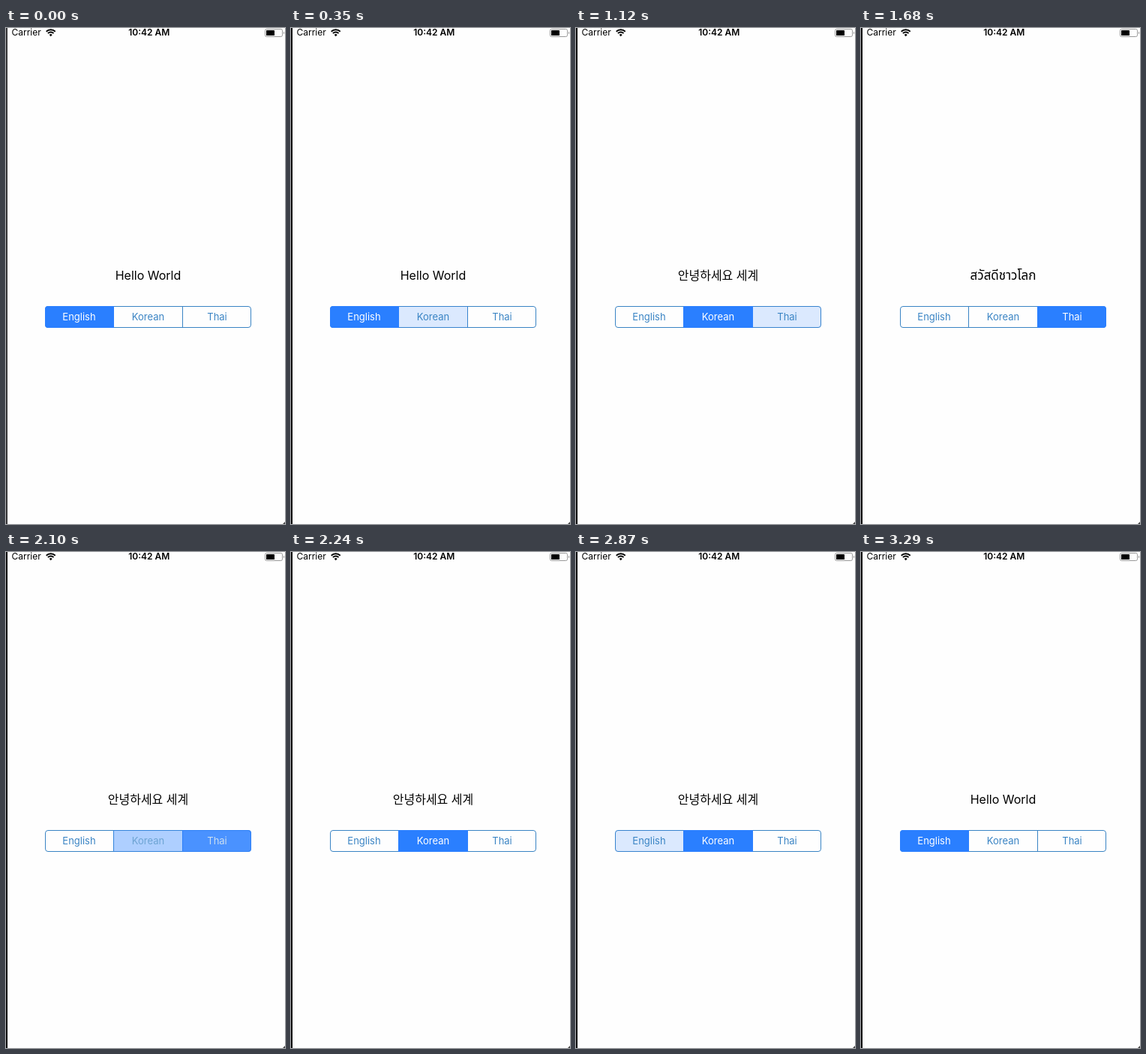
Write an HTML page that moves like this. It is 372 px wide and 660 px high and loops after 3.36 s.

```html
<!DOCTYPE html>
<html lang="en">
<head>
<meta charset="utf-8">
<title>Language switch</title>
<style>
html, body { margin: 0; height: 100%; overflow: hidden; background: #fefefe; }
svg { display: block; width: 372px; height: 660px; font-family: Inter, sans-serif; }
.status { font-size: 12px; }
.label { font-size: 13px; text-anchor: middle; }
#greeting { font-size: 16px; text-anchor: middle; }
#greeting:lang(ko) { font-family: "Noto Sans CJK KR", "Noto Sans CJK", sans-serif; }
#greeting:lang(th) { font-family: "Noto Sans Thai Looped", "Noto Sans Thai", "Noto Sans", sans-serif; font-size: 17px; }
</style>
</head>
<body>
<svg viewBox="0 0 372 660">
  <clipPath id="pill"><rect x="52" y="370" width="275" height="29" rx="4"/></clipPath>
  <rect id="edge" width="2" height="660"/>
  <path d="M372 657v3h-3z" fill="#444"/>

  <g class="status">
    <text x="7.5" y="10.4">Carrier</text>
    <text x="190.7" y="10.4" font-weight="600" text-anchor="middle">10:42 AM</text>
  </g>
  <g fill="none" stroke="#000" stroke-width="1.9">
    <path d="M53.7 4.7a8.6 8.6 0 0 1 12 0M55.9 7.1a5.4 5.4 0 0 1 7.6 0"/>
    <path d="M57.7 9a2.8 2.8 0 0 1 4 0l-2 2.2z" fill="#000" stroke="none"/>
  </g>
  <rect x="345.5" y="1.5" width="23" height="10" rx="2" fill="none" stroke="#999"/>
  <rect x="347" y="3" width="11" height="7" rx=".6"/>
  <path d="M370 4.5q2 2 0 4z" fill="#888"/>

  <text id="greeting" x="189.5" y="335"></text>
  <g fill="none" stroke="#3a84c4">
    <rect x="52.5" y="370.5" width="274" height="28" rx="3.5"/>
    <path d="M143.5 370v29M235.5 370v29"/>
  </g>
  <g id="fills" clip-path="url(#pill)" fill="#2a7fff"></g>
  <g id="labels" class="label"></g>
</svg>
<script>
const LOOP = 3360, STEP = 70, PRESSED = 0.16;
const languages = [
  { name: "English", lang: "en", hello: "Hello World", x: 52, width: 92 },
  { name: "Korean", lang: "ko", hello: "안녕하세요 세계", x: 143, width: 93 },
  { name: "Thai", lang: "th", hello: "สวัสดีชาวโลก", x: 235, width: 92 },
];
// Each tap: finger down, finger up, and the segments it moves between.
const taps = [
  { down: 280, up: 420, from: 0, to: 1 },
  { down: 1120, up: 1260, from: 1, to: 2 },
  { down: 1960, up: 2100, from: 2, to: 1 },
  { down: 2730, up: 2940, from: 1, to: 0 },
];

const find = id => document.getElementById(id);
const edge = find("edge"), greeting = find("greeting");

function add(parent, tag, attributes) {
  const node = document.createElementNS("http://www.w3.org/2000/svg", tag);
  for (const key in attributes) node.setAttribute(key, attributes[key]);
  return find(parent).appendChild(node);
}

languages.forEach((item, i) => {
  item.fill = add("fills", "rect", { x: item.x, y: 370, width: item.width, height: 29 });
  item.label = add("labels", "text", { x: 97.5 + 92 * i, y: 389 });
  item.label.textContent = item.name;
});

const mix = (a, b, k) => a + (b - a) * k;
const smooth = k => k * k * (3 - 2 * k);
const clamp = k => Math.min(1, Math.max(0, k));

function draw(now) {
  const t = Math.floor(now % LOOP / STEP) * STEP;
  const tap = taps.findLast(item => t >= item.down);
  const fill = [0, 0, 0], white = [0, 0, 0];
  let current = 0;

  if (tap) {
    const released = t >= tap.up;
    const p = released ? smooth(clamp((t - tap.up + STEP) / (3 * STEP))) : 0;
    current = released ? tap.to : tap.from;
    fill[tap.from] = 1 - p ** 1.4;
    fill[tap.to] = mix(PRESSED, 1, p);
    white[tap.from] = 1 - p;
    white[tap.to] = p;
  } else {
    fill[0] = white[0] = 1;
  }

  languages.forEach((item, i) => {
    const rgb = [58, 132, 196].map(c => Math.round(mix(c, 255, white[i])));
    item.fill.setAttribute("opacity", fill[i]);
    item.label.setAttribute("fill", `rgb(${rgb})`);
  });
  greeting.setAttribute("lang", languages[current].lang);
  greeting.textContent = languages[current].hello;
  edge.setAttribute("fill", tap ? "#060606" : "#39383b");
}

const start = performance.now();
function tick() {
  draw(performance.now() - start);
  requestAnimationFrame(tick);
}
tick();
</script>
</body>
</html>
```
